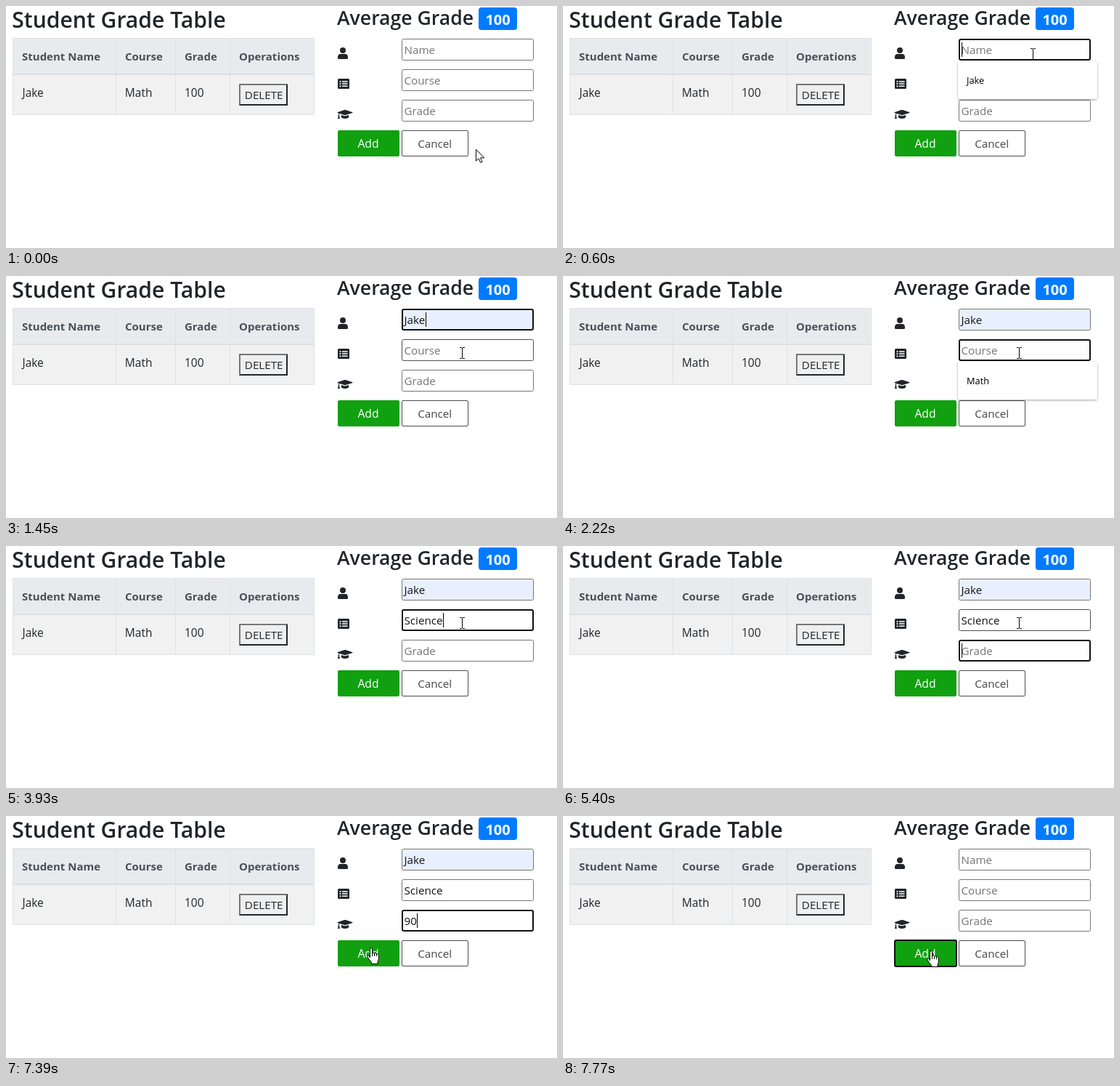
An HTML page that plays this animation: 759 px wide and 333 px high, repeating every 8000 ms.

```html
<!DOCTYPE html>
<html lang="en">
<head>
<meta charset="utf-8">
<title>Grade table form</title>
<style>
  html, body { margin: 0; width: 100%; height: 100%; overflow: hidden; background: #fff; }
  svg { display: block; width: 759px; height: 333px; }
  text { font: 400 15.2px "Open Sans", "Noto Sans", sans-serif; fill: #212529; white-space: pre; }
  .h1 { font-size: 30.1px; font-weight: 600; }
  .h2 { font-size: 26.6px; font-weight: 600; }
  .th { font-size: 15px; font-weight: 700; fill: #495057; }
  .td { font-size: 15.5px; }
  .badge { font-size: 20px; font-weight: 700; fill: #fff; text-anchor: middle; }
  .mid { text-anchor: middle; }
  .item { font-size: 12.8px; font-weight: 500; fill: #000; }
  .icon { fill: #212529; }
</style>
</head>
<body>
<svg id="stage" viewBox="0 0 759 333" xmlns="http://www.w3.org/2000/svg">
  <defs>
    <filter id="shadow" x="-5%" y="-10%" width="110%" height="125%">
      <feDropShadow dx="0" dy="1" stdDeviation="1.4" flood-color="#000" flood-opacity=".38"/>
    </filter>
  </defs>

  <text class="h1" x="8.3" y="30">Student Grade Table</text>
  <g shape-rendering="crispEdges">
    <rect x="9" y="44" width="416" height="50" fill="#e7ebee"/>
    <rect x="9" y="94" width="416" height="56" fill="#f1f1f1"/>
    <path d="M9.5 44V150M151.5 44V150M233.5 44V150M308.5 44V150M424.5 44V150M9 44.5H425M9 149.5H425" stroke="#dee2e6" fill="none"/>
    <path d="M9 94H425" stroke="#dbe0e4" stroke-width="2"/>
  </g>
  <text class="th" x="22" y="75">Student Name</text>
  <text class="th" x="164" y="75">Course</text>
  <text class="th" x="246" y="75">Grade</text>
  <text class="th" x="321" y="75">Operations</text>
  <text class="td" x="22.5" y="125">Jake</text>
  <text class="td" x="163.8" y="125">Math</text>
  <text class="td" x="246" y="125">100</text>
  <rect x="321" y="107" width="67" height="30" fill="#efefef"/>
  <path d="M321 137V107H388L386 109H323V135Z" fill="#767676"/>
  <path d="M321 137H388V107L386 109V135H323Z" fill="#212529"/>
  <text class="mid" x="355.2" y="128">DELETE</text>

  <text class="h2" x="456" y="26">Average Grade</text>
  <rect x="651" y="2" width="53" height="31" rx="4" fill="#007bff"/>
  <text class="badge" x="677.5" y="26">100</text>

  <g transform="translate(.5 0)">
    <g class="icon">
      <circle cx="463.5" cy="61" r="4"/>
      <path d="M460.4 66H466.6Q470.5 66.3 470.5 70.2V71.5Q470.5 73 469 73H458Q456.5 73 456.5 71.5V70.2Q456.5 66.3 460.4 66Z"/>
      <rect x="456.5" y="100" width="16" height="14" rx="1.5"/>
      <path d="M456 146.6Q456 146.1 456.7 145.9L465.6 143.1Q466.5 142.8 467.4 143.1L476.3 145.9Q477 146.1 477 146.6T476.3 147.3L467.4 150.1Q466.5 150.4 465.6 150.1L459.2 148.1Q458.3 148.8 458.3 150Q459.4 150.9 458.7 151.8L459.5 155H456.4L457.2 151.8Q456.5 150.8 457.4 150.1Q457.4 148.7 458.1 147.8L456.7 147.3Q456 147.1 456 146.6ZM461.6 150L465.3 151.2Q466.5 151.5 467.7 151.2L471.4 150L471.9 153Q470.5 155 466.5 155T461.1 153Z"/>
    </g>
    <g fill="#fff">
      <circle cx="460" cy="104" r="1.1"/><circle cx="460" cy="107" r="1.1"/><circle cx="460" cy="110.3" r="1.1"/>
      <path d="M462.5 103.2H470V104.7H462.5ZM462.5 106.3H470V107.8H462.5ZM462.5 109.5H470V111H462.5Z"/>
    </g>
  </g>

  <g id="fields"></g>

  <rect x="457" y="171" width="85" height="36" rx="2" fill="#10a010"/>
  <rect id="addRing" x="457" y="171" width="85" height="36" rx="2" fill="none" stroke="#101010" stroke-width="2"/>
  <text class="mid" x="499" y="195" style="fill:#fff;font-size:15.7px">Add</text>
  <rect x="545.5" y="171.5" width="91" height="35" rx="1.5" fill="#fff" stroke="#4a4d50"/>
  <text class="mid" x="590.7" y="195" style="fill:#444">Cancel</text>

  <g id="menu">
    <rect x="544" y="0" width="192" height="52" rx="3" fill="#fff" filter="url(#shadow)"/>
    <rect id="hover" x="544" y="8" width="192" height="36" fill="#c8c8c8"/>
    <text id="item" class="item" x="556" y="31"></text>
  </g>

  <g id="arrow">
    <path d="M.5 .5V16.2L4.1 12.8L6.6 18.5L9 17.4L6.6 11.9H11.7Z" fill="#fff" stroke="#000"/>
  </g>
  <g id="beam" shape-rendering="crispEdges">
    <path d="M-3 -7.5H0M1 -7.5H4M.5 -7V7M-3 7.5H0M1 7.5H4" fill="none" stroke="#000"/>
  </g>
  <g id="hand">
    <path d="M-1.5 13V1Q-1.5 -.5 0 -.5T1.5 1V7Q2 5.8 3.3 6.1T4.5 7.5Q5 6.5 6.3 6.8T7.5 8.3Q8 7.4 9.1 7.8T10.3 9.5V14.5Q10.2 16.5 9 18.5V21.5H.5V19.5L-2.6 15.5L-5 12Q-5.6 10.5 -4.5 10T-2.5 11Z" fill="#fff" stroke="#000"/>
    <path d="M1.5 7V11M4.5 7.5V11M7.5 8.3V11" stroke="#000" fill="none"/>
  </g>
</svg>
<script>
const LOOP = 8000;
const CLEAR = 7690;
const $ = id => document.getElementById(id);
const show = (node, on) => node.setAttribute("visibility", on ? "visible" : "hidden");

function set(node, attrs) {
  for (const key in attrs) node.setAttribute(key, attrs[key]);
  return node;
}

function make(tag, attrs) {
  const node = document.createElementNS("http://www.w3.org/2000/svg", tag);
  return $("fields").appendChild(set(node, attrs));
}

const fields = ["Name", "Course", "Grade"].map((hint, i) => {
  const y = 45 + 42 * i;
  return {
    hint, y,
    box: make("rect", { rx: 2 }),
    text: make("text", { x: 548.5, y: y + 21 }),
    caret: make("rect", { y: y + 5, width: 1, height: 20, fill: "#000" })
  };
});

// [time, value], latest one that has passed wins
const values = [
  [[0, ""], [980, "Jake"], [CLEAR, ""]],
  [[0, ""], [2750, "S"], [3210, "Sc"], [3440, "Sci"], [3610, "Scie"],
   [3760, "Scien"], [3850, "Scienc"], [3930, "Science"], [CLEAR, ""]],
  [[0, ""], [6060, "9"], [6160, "90"], [CLEAR, ""]]
];
const focus = [[0, -1], [520, 0], [1740, 1], [4390, 2], [7540, 3]];
const caretOn = [[0, false], [520, true], [2220, false], [2750, true],
  [4920, false], [5400, true], [5950, false], [6060, true], [6710, false], [7240, true]];
const menus = [[0, null], [600, [0, "Jake"]], [1430, null], [1820, [1, "Math"]], [2750, null]];

// pointer stops: time, x, y
const route = [[70, 647, 197], [520, 647, 66], [910, 647, 66], [1040, 627, 88],
  [1140, 627, 88], [1420, 628, 106], [6710, 628, 106], [6900, 612, 86],
  [7400, 503, 182], [7540, 503, 182], [7750, 507, 186]];

function at(list, t) {
  let value = list[0][1];
  for (const [time, next] of list) if (t >= time) value = next;
  return value;
}

function pointer(t) {
  let from = route[0];
  for (const to of route) {
    if (t < to[0]) {
      const p = Math.max(0, (t - from[0]) / (to[0] - from[0] || 1));
      const e = p * p * (3 - 2 * p);
      return [from[1] + (to[1] - from[1]) * e, from[2] + (to[2] - from[2]) * e];
    }
    from = to;
  }
  return [from[1], from[2]];
}

const inside = (x, y, left, top, w, h) => x >= left && x < left + w && y >= top && y < top + h;

function drawField(f, i, t, hovered) {
  const value = at(values[i], t);
  const active = at(focus, t) === i;
  const preview = i === 0 && t >= 980 && t < 1430;
  const line = active ? 2 : 1;
  // the border always stays within the same 182 by 30 box
  set(f.box, {
    x: 545 + line / 2, y: f.y + line / 2, width: 182 - line, height: 30 - line,
    fill: i === 0 && value ? "#e8f0fe" : "#fff",
    stroke: active ? "#101010" : hovered ? "#4f4f4f" : "#767676",
    "stroke-width": line
  });
  f.text.textContent = value || f.hint;
  f.text.style.fill = value ? "#111" : "#757575";
  f.text.style.fontSize = preview ? "14px" : "";
  const end = value && !preview ? f.text.getComputedTextLength() : 0;
  f.caret.setAttribute("x", Math.round(549 + end));
  show(f.caret, active && at(caretOn, t));
}

function render(t) {
  const [x, y] = pointer(t).map(Math.round);
  const menu = at(menus, t);
  const top = menu ? fields[menu[0]].y + 31 : 0;
  const overMenu = menu && inside(x, y, 544, top, 192, 52);
  const over = overMenu ? null : fields.find(f => inside(x, y, 545, f.y, 182, 30));

  fields.forEach((f, i) => drawField(f, i, t, f === over));
  show($("addRing"), at(focus, t) === 3);
  show($("menu"), menu);
  show($("hover"), menu && inside(x, y, 544, top + 8, 192, 36));
  if (menu) {
    $("menu").setAttribute("transform", `translate(0 ${top})`);
    $("item").textContent = menu[1];
  }

  let kind = over ? "beam" : "arrow";
  if (inside(x, y, 457, 171, 85, 36) || inside(x, y, 545, 171, 92, 36)) kind = "hand";
  for (const id of ["arrow", "beam", "hand"]) show($(id), id === kind);
  $(kind).setAttribute("transform", `translate(${x} ${y})`);
}

const start = performance.now();
function tick() {
  render((performance.now() - start) % LOOP);
  requestAnimationFrame(tick);
}
render(0);
tick();
</script>
</body>
</html>
```
